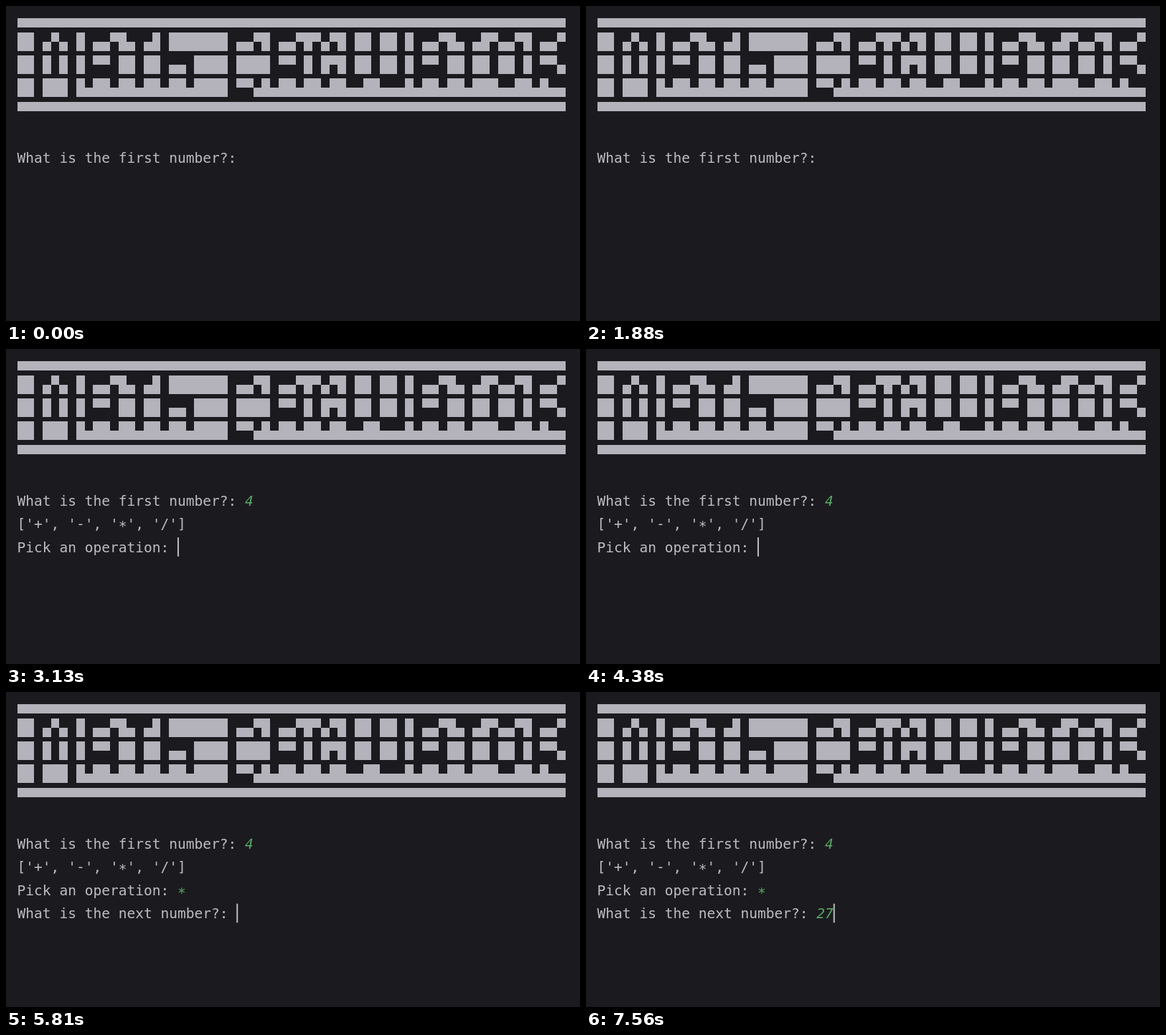
Write an HTML page with a canvas that moves like this. It is 800 px wide and 440 px high and loops after 8000 ms.

```html
<!DOCTYPE html>
<html lang="en">
<head>
<meta charset="utf-8">
<title>Console</title>
<style>
  html, body { margin: 0; width: 100%; height: 100%; overflow: hidden; background: #1b1a1e; }
  canvas { display: block; }
</style>
</head>
<body>
<canvas id="stage" width="800" height="440"></canvas>
<script>
const ctx = document.getElementById('stage').getContext('2d');
const LOOP = 8000;
const LEFT = 15.6, TOP = 4.2, CELL = 11.755, LINE = 32.4, COLS = 65;
const BG = '#1b1a1e', BLOCK = '#b4b2ba', TEXT = '#bdbcc0', INPUT = '#58a866';
const FONT = '19.55px "DejaVu Sans Mono", monospace';

// Banner letters, cut out of a light band
const GLYPHS = {
  M: ['█▀▄▀█', '█ █ █', '█   █'],
  a: ['█▀▀▄', '█▄▄█', '▀  ▀'],
  t: ['▀█▀', ' █ ', ' ▀ '],
  h: ['█   ', '█▀▀█', '▀  ▀'],
  C: ['█▀▀▄', '█   ', '█▄▄▀'],
  c: ['▄▀▄', '█ ▄', ' ▀ '],
  l: ['█ ', '█ ', '▀▀'],
  u: ['█  █', '█  █', ' ▀▀▀'],
  o: ['▄▀▀▄', '█  █', ' ▀▀ '],
  r: ['█▀▀▄', '█▄▄▀', '▀ ▀▀'],
  ' ': ['  ', '  ', '  ']
};
const TITLE = 'Math Cacluator';
const banner = [0, 1, 2].map(i => '  ' + [...TITLE].map(ch => GLYPHS[ch][i]).join(' '));

const colX = c => LEFT + c * CELL;
const rowY = r => TOP + r * LINE;

// half: 0 = upper, 1 = lower
function halfBlock(col, row, half, span = 1) {
  const x = Math.round(colX(col)), y = Math.round(rowY(row) + half * 13);
  ctx.fillRect(x, y, Math.round(colX(col + span)) - x, 13);
}

function drawBanner() {
  ctx.fillStyle = BLOCK;
  halfBlock(0, 0, 1, COLS);
  halfBlock(0, 4, 0, COLS);
  banner.forEach((line, i) => {
    [...line].forEach((ch, col) => {
      if (!'█▀'.includes(ch)) halfBlock(col, i + 1, 0);
      if (!'█▄'.includes(ch)) halfBlock(col, i + 1, 1);
    });
  });
}

function print(str, col, row, color = TEXT, style = '') {
  ctx.font = style + ' ' + FONT;
  ctx.fillStyle = color;
  [...str].forEach((ch, i) => {
    const drop = ch === '*' ? 2.8 : 0;
    ctx.fillText(ch, colX(col + i), rowY(row) + 20.4 + drop);
  });
}

// [from, to, text, column, row, colour, style]
const prints = [
  [0, LOOP, 'What is the first number?:', 0, 6],
  [2060, LOOP, '4', 27, 6, INPUT, 'italic'],
  [3130, LOOP, "['+', '-', '*', '/']", 0, 7],
  [3130, LOOP, 'Pick an operation:', 0, 8],
  [4810, LOOP, '*', 19, 8, INPUT],
  [5810, LOOP, 'What is the next number?:', 0, 9],
  [6810, LOOP, '2', 26, 9, INPUT, 'italic'],
  [7560, LOOP, '7', 27, 9, INPUT, 'italic']
];

// [from, to, column, row]
const carets = [
  [380, 880, 27, 6],
  [1380, 1880, 27, 6],
  [2130, 2810, 28, 6],
  [2940, 3130, 0, 7],
  [3130, 3810, 19, 8],
  [4380, 4810, 19, 8],
  [4810, 5380, 20, 8],
  [5560, 5810, 0, 9],
  [5810, 6380, 26, 9],
  [6810, 7380, 27, 9],
  [7560, LOOP, 28, 9]
];

function draw(t) {
  const active = ([from, to]) => t >= from && t < to;
  ctx.fillStyle = BG;
  ctx.fillRect(0, 0, 800, 440);
  drawBanner();
  prints.filter(active).forEach(([, , ...args]) => print(...args));
  ctx.fillStyle = TEXT;
  carets.filter(active).forEach(([, , col, row]) =>
    ctx.fillRect(colX(col), rowY(row) - 0.2, 2, 26.6));
}

const start = performance.now();
function tick() {
  draw((performance.now() - start) % LOOP);
  requestAnimationFrame(tick);
}
tick();
</script>
</body>
</html>
```
